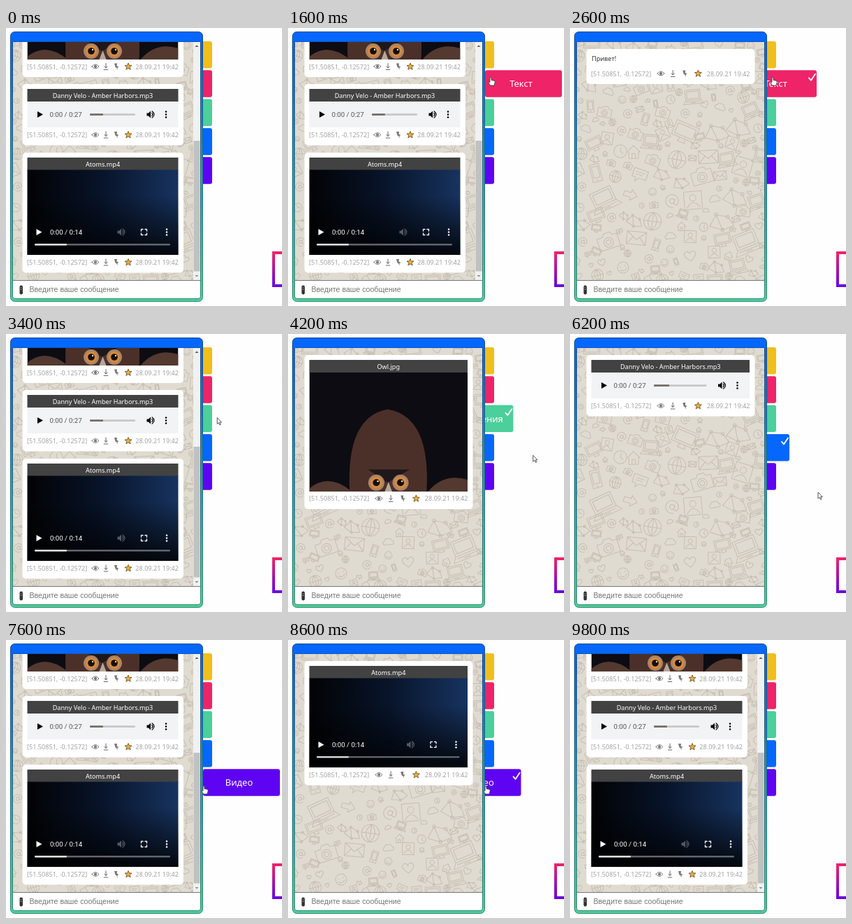
Write an HTML page that moves like this. It is 395 px wide and 397 px high and loops after 10000 ms.

```html
<!DOCTYPE html>
<html lang="ru">
<head>
<meta charset="utf-8">
<title>Фильтр сообщений</title>
<style>
  html, body { margin: 0; width: 100%; height: 100%; overflow: hidden; background: #fefefe; }
  body > svg { display: block; width: 395px; height: 397px; }
  text { font-family: "Noto Sans", "Open Sans", sans-serif; font-size: 9.1px; }
  .mid { text-anchor: middle; fill: #fff; }
  .meta { fill: #a2a2a2; }
  .time { font: 9.7px Roboto, sans-serif; }
  .tab { font-size: 13px; }
  .line { fill: none; stroke-linecap: round; stroke-linejoin: round; }
</style>
</head>
<body>
<svg viewBox="0 0 395 397">
  <defs>
    <linearGradient id="frame" x2="0" y2="1">
      <stop offset=".1" stop-color="#0567fd"/><stop offset="1" stop-color="#4bcf9b"/>
    </linearGradient>
    <linearGradient id="edge" x2="0" y2="1">
      <stop stop-color="#174a86"/><stop offset="1" stop-color="#2f8a6c"/>
    </linearGradient>
    <linearGradient id="box" x2="0" y2="1">
      <stop stop-color="#ee2368"/><stop offset="1" stop-color="#6a08e0"/>
    </linearGradient>
    <linearGradient id="film">
      <stop stop-color="#020305"/><stop offset=".5" stop-color="#08142a"/><stop offset="1" stop-color="#17335f"/>
    </linearGradient>
    <linearGradient id="shade" x2="0" y2="1">
      <stop offset=".3" stop-opacity="0"/><stop offset="1" stop-opacity=".85"/>
    </linearGradient>
    <clipPath id="inner"><rect x="10" y="20" width="268" height="340"/></clipPath>

    <path id="play" d="M-4-4.500 4 0-4 4.500z"/>
    <g id="volume">
      <path d="M-5.500-2h2.500L0-5V5L-3 2h-2.500z"/>
      <path class="line" stroke="currentColor" stroke-width="1.200" d="M1.800-2.200q2 2.200 0 4.400M2-4.700q6 4.700 0 9.400"/>
    </g>
    <path id="expand" class="line" stroke="#fff" stroke-width="1.300"
      d="M-4-1.500V-4H-1.500M1.500-4H4V-1.500M4 1.500V4H1.500M-1.500 4H-4V1.500"/>
    <g id="dots"><circle cy="-4" r="1.250"/><circle r="1.250"/><circle cy="4" r="1.250"/></g>
    <g id="eye" class="line" stroke="#777">
      <path d="M-5 0Q0-6 5 0Q0 6-5 0z"/><circle r="1.600" fill="#777"/>
    </g>
    <path id="download" class="line" stroke="#666" d="M0-4.500V2M-2-.2 0 2 2-.2M-2.800 4.500H2.800"/>
    <path id="pin" fill="#777" d="M-3-4.500H1L.5-1 3.500.5 1.500 1.500V5L0 1.500-1.500 1z"/>
    <path id="star" fill="#f0ae2c" stroke="#5a4630" stroke-width=".8"
      d="M0-5 1.400-1.700 5-1.500 2.200.8 3.200 4.400 0 2.400-3.200 4.400-2.200.8-5-1.500-1.400-1.700z"/>
    <g id="owlEye">
      <circle r="11" fill="#a8846a"/><circle r="8" fill="#d98a35"/>
      <circle r="4.800" fill="#140e10"/><circle cx="2" cy="-2" r="1.200" fill="#ddd"/>
    </g>
  </defs>

  <rect x="383" y="321" width="40" height="47" fill="none" stroke="url(#box)" stroke-width="4"/>
  <g id="tabs"></g>

  <rect x="6.500" y="5.500" width="275" height="385" rx="6" fill="url(#frame)" stroke="url(#edge)"/>
  <path d="M9.500 20V383q0 3.500 3.500 3.500H275q3.500 0 3.500-3.500V20z" fill="#fff" stroke="url(#edge)"/>
  <g clip-path="url(#inner)">
    <rect x="10" y="20" width="268" height="340" fill="#e0dbd1"/>
    <g id="wallpaper" class="line" stroke="#c6beb2"></g>
    <g id="views"></g>
  </g>
  <path d="M10 360.500H278" stroke="#777"/>
  <rect x="19.500" y="367.500" width="4.500" height="13" rx="2.200" fill="#333"/>
  <path d="M20.500 371h2.500M20.500 373.500h2.500" stroke="#999" stroke-width=".8"/>
  <text x="33.500" y="377" fill="#757575" style="font:10.600px 'Liberation Sans',sans-serif">Введите ваше сообщение</text>

  <g id="cursor" fill="#fff" stroke="#444" stroke-width=".9" stroke-linejoin="round">
    <path id="arrow" d="M0 0V9L2.100 7.200 3.700 10.500 5.100 9.800 3.600 6.600H6.300z"/>
    <path id="hand" d="M-1 1Q0-.5 1 1V4.500L5 5.200Q6.500 5.600 6.200 7.500L5 12H-.5L-3 8Q-3 6.500-1 7.500z"/>
  </g>
</svg>
<script>
const $ = id => document.getElementById(id);
const use = (id, x, y, attrs = '') => `<use href="#${id}" x="${x}" y="${y}" ${attrs}/>`;
const rect = (x, y, w, h, fill, r = 0) =>
  `<rect x="${x}" y="${y}" width="${w}" height="${h}" rx="${r}" fill="${fill}"/>`;
const text = (x, y, cls, str, attrs = '') => `<text x="${x}" y="${y}" class="${cls}" ${attrs}>${str}</text>`;

// Message cards; `extra` is the width gained when the scrollbar is gone.
const EXTRA = 10.5, MEDIA = 216;

const meta = (y, extra) =>
  text(30, y + 3.5, 'meta', '[51.50851, -0.12572]') +
  ['eye', 'download', 'pin', 'star'].map((id, i) =>
    use(id, [128, 143, 158, 175][i] + extra * (i + 1) / 5, y)).join('') +
  text(247 + extra, y + 3.5, 'meta', '28.09.21 19:42', 'text-anchor="end"');

const card = (y, height, extra) => rect(23.5, y, 230.5 + extra, height, '#fff', 5);

const titled = (y, height, extra, title) =>
  card(y, height, extra) +
  rect(30.5, y + 7, MEDIA + extra, 18, '#424242') +
  text(138.5 + extra / 2, y + 19.5, 'mid', title);

const textCard = (y, extra) =>
  card(y, 50, extra) + text(31, y + 17, '', 'Привет!', 'fill="#333"') + meta(y + 35, extra);

const audioCard = (y, extra) =>
  titled(y, 87.5, extra, 'Danny Velo - Amber Harbors.mp3') +
  rect(30.5, y + 25, MEDIA + extra, 37, '#f1f3f4') +
  use('play', 49, y + 43.5) +
  text(62.5, y + 47, 'time', '0:00 / 0:27', 'fill="#555"') +
  rect(120, y + 42.3, 65 + extra, 2.6, '#c9c7c6', 1) +
  rect(120, y + 42.3, 19 + extra * .3, 2.6, '#776e68', 1) +
  use('volume', 207 + extra, y + 43.5) + use('dots', 229 + extra, y + 43.5) +
  meta(y + 72.5, extra);

function photoCard(y, extra) {
  const width = MEDIA + extra, height = width * .75;
  return titled(y, height + 50, extra, 'Owl.jpg') +
    `<svg x="30.5" y="${y + 25}" width="${width}" height="${height}" viewBox="0 0 216 162">
      ${rect(0, 0, 216, 162, '#0d0c12')}
      <path d="M55 162Q50 60 107 50Q166 60 160 162z" fill="#4b3029"/>
      <path d="M80 132 107 150 137 132z" fill="#20171a"/>
      <path d="M0 158Q26 136 58 162H0zM162 162Q184 136 216 146V162z" fill="#53392f"/>
      ${use('owlEye', 91.5, 150)}${use('owlEye', 124.5, 150)}
      <path d="M108 149 113 162H103z" fill="#b5a79c"/></svg>` +
    meta(y + height + 35, extra);
}

function videoCard(y, extra) {
  const width = MEDIA + extra, height = width * 9 / 16, bottom = y + 24.5 + height, row = bottom - 32.5;
  return titled(y, height + 50, extra, 'Atoms.mp4') +
    rect(30.5, y + 24.5, width, height, 'url(#film)') + rect(30.5, y + 24.5, width, height, 'url(#shade)') +
    use('play', 47.5, row, 'fill="#fff"') +
    text(63, row + 3.5, 'time', '0:00 / 0:14', 'fill="#fff"') +
    use('volume', 165 + extra, row, 'fill="#555b65" color="#555b65"') +
    use('expand', 197.5 + extra, row) + use('dots', 230 + extra, row, 'fill="#fff"') +
    rect(41, bottom - 16, 194 + extra, 2.4, '#62666c', 1) + rect(41, bottom - 16, 46, 2.4, '#ddd', 1) +
    meta(bottom + 10.5, extra);
}

const scrollbar =
  rect(268, 20, 10, 340, '#f1f1f1') + rect(268.5, 161, 9, 186.5, '#c1c1c1') +
  '<path d="M270.5 27 273 24.5 275.5 27z" fill="#555"/><path d="M270.5 353 273 355.5 275.5 353z" fill="#888"/>';

const views = {
  all: photoCard(-142, 0) + audioCard(80, 0) + videoCard(178, 0) + scrollbar,
  text: textCard(30, EXTRA),
  photo: photoCard(30, EXTRA),
  audio: audioCard(30, EXTRA),
  video: videoCard(30, EXTRA),
};
$('views').innerHTML = Object.entries(views).map(([id, body]) => `<g id="${id}">${body}</g>`).join('');

// Doodle wallpaper: a few placed drawings, then small ones scattered in the gaps
const doodles = {
  laptop: 'M-14-12H14V7H-14zM-11-9H11V4H-11zM-14 7-19 14H19L14 7M-13 10H13M-4 12H4',
  monitor: 'M-15-10H15V9H-15zM-12-7H12V6H-12zM-3 9-5 14H5L3 9',
  phone: 'M-6-11H6V11H-6zM-4-8H4V6H-4zM-1 9H1',
  globe: 'M-11 0a11 11 0 1 0 22 0a11 11 0 1 0-22 0zM0-11V11M-11 0H11M0-11Q-11 0 0 11Q11 0 0-11',
  envelope: 'M-12-8H12V8H-12zM-12-8 0 2 12-8M-12 8-4-1M12 8 4-1',
  camera: 'M-13-7H-6L-3-11H5L7-7H13V9H-13zM-6 1a6 6 0 1 0 12 0a6 6 0 1 0-12 0zM-3 1a3 3 0 1 0 6 0a3 3 0 1 0-6 0',
  clock: 'M-8 0a8 8 0 1 0 16 0a8 8 0 1 0-16 0zM0-5V0L4 2',
  house: 'M-8 0 0-8 8 0H6V8H-6V0M-2 8V2H2V8',
  person: 'M-11-11H11V11H-11zM-4-3a4 4 0 1 0 8 0a4 4 0 1 0-8 0zM-8 9Q0-3 8 9',
  heart: 'M0 6Q-11-2-5-6Q-1-7 0-3Q1-7 5-6Q11-2 0 6z',
  smile: 'M-7 0a7 7 0 1 0 14 0a7 7 0 1 0-14 0zM-3-2v1M3-2v1M-4 2Q0 6 4 2',
  arrow: 'M-8-3H1V-7L9 0 1 7V3H-8z',
  bubble: 'M-9-7H9V4H0L-4 9V4H-9zM-5-3H5M-5 0H3',
  at: 'M-3 0a3 3 0 1 0 6 0a3 3 0 1 0-6 0M3-3V2Q8 5 8-1A8 8 0 1 0 4 7',
  cloud: 'M-8 5Q-13 0-7-2Q-6-8 0-6Q6-8 7-2Q13 0 8 5z',
  net: 'M-14 5-4-8 10-3 16 9 1 12-14 5M-4-8 1 12M-6-8a2 2 0 1 0 4 0a2 2 0 1 0-4 0M8-3a2 2 0 1 0 4 0a2 2 0 1 0-4 0M-1 12a2 2 0 1 0 4 0a2 2 0 1 0-4 0',
};
const placed = `laptop 48 244|clock 72 176|house 91 177|phone 37 207|monitor 165 148|globe 153 188|
  envelope 198 184|camera 189 212|at 146 247|globe 118 276|person 176 246|camera 55 305|
  bubble 100 210|envelope 95 300|heart 172 326|smile 76 342|person 247 198|net 235 240|net 215 275|
  laptop 252 305|arrow 86 238|net 240 140|net 208 148`;

let seed = 7;
const random = () => (seed = seed * 16807 % 2147483647) / 2147483647;
const spots = placed.split('|').map(item => {
  const [kind, x, y] = item.trim().split(' ');
  return { kind, x: +x, y: +y, r: 16, scale: 1.15 };
});
const kinds = Object.keys(doodles);
for (let i = 0; i < 3000; i++) {
  const r = i < 1000 ? 10 : 6;
  const spot = { kind: kinds[Math.floor(random() * kinds.length)], x: 8 + random() * 272, y: 18 + random() * 344, r, scale: r / 13 };
  if (spots.every(s => Math.hypot(s.x - spot.x, s.y - spot.y) > s.r + r - 1)) spots.push(spot);
}
$('wallpaper').innerHTML = spots.map(({ kind, x, y, scale }, i) =>
  `<path d="${doodles[kind]}" stroke-width="${1 / scale}"
    transform="translate(${x} ${y}) rotate(${i * 37 % 50 - 25}) scale(${scale})"/>`).join('');

// Each tab slides out at `enter` and in at `out`; while its filter is on, the pointer
// leaves and comes back, and the tab keeps peeking out to show its check mark.
const OPEN = 97, PEEK = 19, SLIDE = 350;
const tabs = [
  { color: '#f0bf1c', label: 'Избранное', hover: [290, 38], enter: 200, out: 1000 },
  { color: '#ee2368', label: 'Текст', view: 'text', hover: [290, 70], enter: 1220, on: 1750, leave: 1950, back: 2500, off: 2700, out: 2900 },
  { color: '#4bcf9b', label: 'Изображения', view: 'photo', hover: [292, 119], enter: 3500, on: 3800, leave: 3950, back: 4450, off: 4700, out: 4858 },
  { color: '#0567fd', label: 'Аудио', view: 'audio', hover: [290, 166], enter: 5250, on: 5600, leave: 5920, back: 6500, off: 6700, out: 6900 },
  { color: '#5f04f2', label: 'Видео', view: 'video', hover: [283, 208], enter: 7200, on: 7750, leave: 8000, back: 8550, off: 8800, out: 9000 },
];
const tabTop = i => 19 + i * 41.3;
$('tabs').innerHTML = tabs.map(({ color, label }, i) => `<g>
  ${rect(185, tabTop(i), 110, 38.5, color, 3)}${text(236.5, tabTop(i) + 24, 'mid tab', label)}
  <path class="check line" stroke="#fff" stroke-width="1.800" d="M284 ${tabTop(i) + 11}l3 3.500 6-9"/>
</g>`).join('');
const tabNodes = [...$('tabs').children];

const slideKeys = ({ view, enter, leave, back, out }) => [
  [enter, 0], [enter + SLIDE, OPEN],
  ...(view ? [[leave, OPEN], [leave + 280, PEEK], [back, PEEK], [back + 200, OPEN]] : []),
  [out, OPEN], [out + SLIDE, 0],
];
tabs.forEach(tab => tab.keys = slideKeys(tab));

function pointerKeys({ view, hover: [x, y], enter, leave, back, out }) {
  const at = (t, dx = 0, dy = 0) => [t, x + dx, y + dy];
  const trip = view ? [at(leave - 30), at(leave + 280, 65, 60), at(back - 220, 65, 60), at(back)] : [];
  return [at(enter), ...trip, at(out - 30), at(out + 142, 49, 51)];
}
const pointer = [[0, 402, 45], ...tabs.flatMap(pointerKeys), [9500, 402, 270]];

function sample(keys, t, column = 1) {
  const next = keys.findIndex(key => key[0] > t);
  if (next === 0) return keys[0][column];
  if (next < 0) return keys[keys.length - 1][column];
  const a = keys[next - 1], b = keys[next];
  return a[column] + (b[column] - a[column]) * (t - a[0]) / (b[0] - a[0]);
}

const LOOP = 10000, STEP = 200;
const show = (node, visible) => node.style.display = visible ? '' : 'none';

function draw(t) {
  const x = sample(pointer, t, 1), y = sample(pointer, t, 2);
  let over = false, current = 'all';
  tabs.forEach(({ keys, view, on, off }, i) => {
    const shift = sample(keys, t), selected = t >= on && t < off;
    if (selected) current = view;
    tabNodes[i].setAttribute('transform', `translate(${shift})`);
    show(tabNodes[i].querySelector('.check'), selected);
    over ||= x < 295 + shift && y > tabTop(i) && y < tabTop(i) + 38.5;
  });
  Object.keys(views).forEach(id => show($(id), id === current));
  $('cursor').setAttribute('transform', `translate(${x} ${y})`);
  show($('hand'), over);
  show($('arrow'), !over);
}

const start = performance.now();
function tick() {
  const t = (performance.now() - start) % LOOP;
  draw(Math.floor(t / STEP) * STEP);
  requestAnimationFrame(tick);
}
tick();
</script>
</body>
</html>
```
